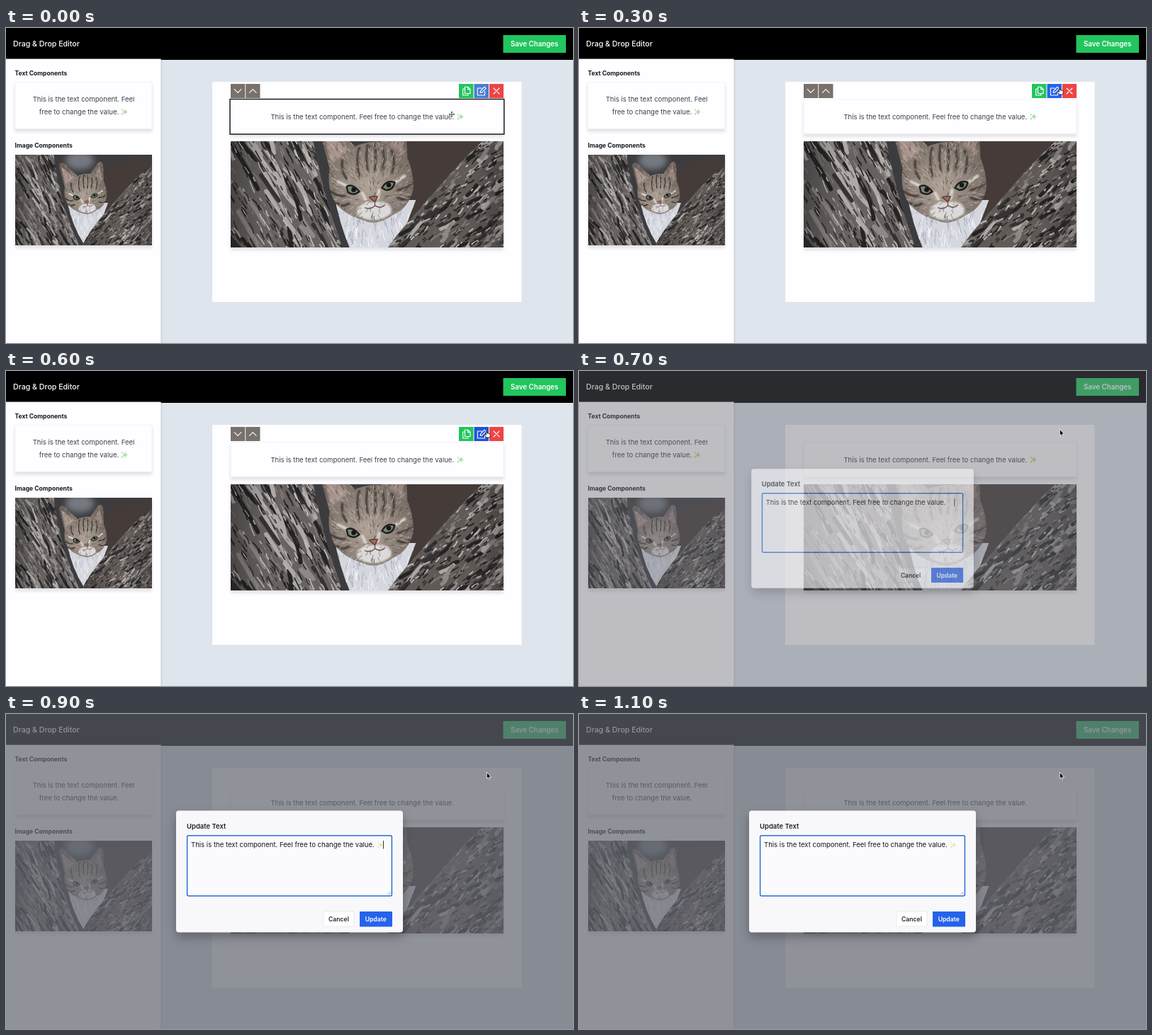
Write an HTML page that moves like this. It is 800 by 445 pixels and loops after 1.7 s.

```html
<!DOCTYPE html>
<html lang="en">
<head>
<meta charset="utf-8">
<title>Drag &amp; Drop Editor</title>
<style>
  html, body { margin: 0; width: 100%; height: 100%; overflow: hidden; background: #dfe5ed; }
  #stage { display: block; width: 800px; height: 445px; font-family: Inter, "Liberation Sans", sans-serif; }
  text { white-space: pre; }
  .mid { text-anchor: middle; }
  .body { font-size: 9.55px; fill: #3c4047; }
  .head { font-size: 8.55px; font-weight: 700; fill: #16181d; }
  .btn { font-size: 8.65px; font-weight: 600; }
  .card { filter: drop-shadow(0 4px 2px #0000001c); }
  .line { fill: none; stroke-linecap: round; stroke-linejoin: round; }
</style>
</head>
<body>
<svg id="stage" viewBox="0 0 800 445">
  <defs>
    <path id="star" d="M0-4.5Q.7-.7 4.5 0Q.7.7 0 4.5Q-.7.7-4.5 0Q-.7-.7 0-4.5Z"/>
    <g id="sparkle">
      <use href="#star" transform="translate(1 0)"/>
      <use href="#star" transform="translate(-3 -3) scale(.4)"/>
      <use href="#star" transform="translate(-3 3) scale(.45)"/>
    </g>

    <path id="leftShape" d="M0 0H54C60 40 68 78 90 128H0Z"/>
    <path id="rightShape" d="M193 14C166 34 145 62 120 90C109 104 101 116 95 128H193Z"/>
    <path id="headShape" d="M70 46L62 16Q64 9 70 13L88 30Q98 26 106 27L117 11Q122 8 124 14L125 38Q130 50 129 61Q126 74 114 79Q103 87 93 82Q79 78 73 68Q68 58 70 46Z"/>
    <path id="chestShape" d="M74 68Q80 100 98 128H108L131 68Z"/>
    <clipPath id="leftClip"><use href="#leftShape"/></clipPath>
    <clipPath id="rightClip"><use href="#rightShape"/></clipPath>
    <clipPath id="headClip"><use href="#headShape"/></clipPath>
    <clipPath id="chestClip"><use href="#chestShape"/></clipPath>
    <filter id="soft" x="-50%" y="-50%" width="200%" height="200%"><feGaussianBlur stdDeviation="4"/></filter>
    <filter id="haze"><feGaussianBlur stdDeviation=".6"/></filter>
    <radialGradient id="face" cx=".52" cy=".65" r=".6">
      <stop stop-color="#b1a498"/>
      <stop offset="1" stop-color="#6c625b"/>
    </radialGradient>
    <linearGradient id="shade" x2="1">
      <stop stop-color="#000" stop-opacity=".3"/>
      <stop offset=".3" stop-color="#000" stop-opacity="0"/>
      <stop offset=".75" stop-color="#000" stop-opacity="0"/>
      <stop offset="1" stop-color="#000" stop-opacity=".25"/>
    </linearGradient>

    <g id="photo" class="line">
      <rect width="193" height="128" fill="#3c3c3f"/>
      <ellipse cx="91" cy="8" rx="20" ry="13" fill="#74797f" filter="url(#soft)"/>
      <path d="M118 32Q140 2 193 4V50L122 90Z" fill="#443b37" filter="url(#soft)"/>
      <use href="#leftShape" fill="#676261"/>
      <g id="leftBark" clip-path="url(#leftClip)"/>
      <use href="#leftShape" fill="url(#shade)"/>
      <use href="#chestShape" fill="#d5d7df"/>
      <g id="chest" clip-path="url(#chestClip)"/>
      <use href="#headShape" fill="url(#face)"/>
      <g filter="url(#haze)">
        <path d="M65 17L71 43L83 32Z" fill="#a8948d"/>
        <path d="M119 15L112 29L123 37Z" fill="#9a857d"/>
        <path d="M96 70Q87 72 90 79Q102 86 113 78Q116 71 106 69Z" fill="#dcd9da"/>
        <path d="M82 58L76 55M93 63L96 69M105 61L104 67M117 55L123 51" stroke="#ded8d2" stroke-width="2"/>
        <path d="M91 51Q88 40 91 31M97 47Q95 38 97 29M102 47Q103 36 102 29M107 47Q110 39 107 30M114 49Q117 42 114 33M82 53Q78 47 79 40M81 65Q76 66 71 62M84 70Q79 74 75 70M118 61Q125 60 128 56M117 66Q123 69 127 66" stroke="#302b28" stroke-width="1.3"/>
      </g>
      <g id="fur" clip-path="url(#headClip)"/>
      <g stroke="#221f1d" stroke-width="1.2" fill="#76887a">
        <path d="M82 58.5Q86 56 91 62Q87 65.5 83 62.5Z"/>
        <path d="M107 59.5Q110 53.5 116 55.5Q115 61 110 61Z"/>
      </g>
      <g fill="#151716"><circle cx="87" cy="60.7" r="1.7"/><circle cx="111.8" cy="57.4" r="1.7"/></g>
      <path d="M98 66Q101 65 104 65.5L102 69.5Z" fill="#a0695c" stroke="#4c3630" stroke-width=".6"/>
      <path d="M102 70V72Q99 75 95 73.5M102 72Q106 74.5 109 71.5" stroke="#66544d" stroke-width=".7"/>
      <use href="#rightShape" fill="#605a56"/>
      <g id="rightBark" clip-path="url(#rightClip)"/>
      <use href="#rightShape" fill="url(#shade)"/>
    </g>
  </defs>

  <rect width="800" height="445" fill="#dfe5ed"/>
  <rect width="800" height="45"/>
  <rect y="43.6" width="218.5" height="402" fill="#fefdff" style="filter:drop-shadow(1px 0 1px #0002)"/>
  <text x="10" y="26.3" font-size="10.6" font-weight="500" fill="#fff">Drag &amp; Drop Editor</text>
  <rect x="701.5" y="10" width="88.5" height="25" fill="#22c55e"/>
  <text class="mid" x="745.7" y="26.2" font-size="9.75" font-weight="600" fill="#fff">Save Changes</text>

  <text class="head" x="12.5" y="67">Text Components</text>
  <rect class="card" x="12.5" y="76.5" width="193.5" height="66" fill="#fefdff" stroke="#eeeef2" stroke-width=".7"/>
  <text class="body mid" x="109.5" y="104.2">This is the text component. Feel</text>
  <text class="body mid" x="103" y="121.8">free to change the value.</text>
  <text class="head" x="12.5" y="169">Image Components</text>
  <g class="card"><svg x="13" y="179" width="193" height="128" viewBox="0 0 193 128"><use href="#photo"/></svg></g>

  <rect x="291" y="76" width="436.5" height="311" fill="#fefdff"/>
  <rect class="card" x="317" y="101" width="385" height="48.5" fill="#fefdff" stroke="#eeeef2" stroke-width=".7"/>
  <text class="body mid" x="502.8" y="128.6">This is the text component. Feel free to change the value.</text>
  <g class="card"><svg x="317" y="160" width="385" height="150" viewBox="0 0 193 128" preserveAspectRatio="xMidYMid slice"><use href="#photo"/></svg></g>
  <g id="stars"><use href="#sparkle" x="641" y="125.3"/><use href="#sparkle" x="167" y="118.5"/></g>

  <rect id="outline" x="316" y="100.5" width="386.8" height="49.5" fill="none" stroke="#111" stroke-width="1.4"/>
  <g id="tools">
    <path d="M317 79h20.3v20H317ZM338.2 79h20.3v20h-20.3Z" fill="#78716c"/>
    <rect x="639" y="79" width="20.5" height="20" fill="#22c55e"/>
    <rect id="edit" x="660.5" y="79" width="20.5" height="20"/>
    <rect x="682" y="79" width="20" height="20" fill="#ef4444"/>
    <g class="line" stroke="#fff" stroke-width="1.1">
      <path d="M322.3 86.7L327.1 91.3L331.9 86.7M343.5 91.3L348.3 86.7L353.1 91.3"/>
      <path d="M647.5 83.3H652L655 86.3V92.5H647.5ZM651.7 83.5V86.6H655M647.5 86H644.7V95H652V92.7"/>
      <path d="M671.5 85H665.3V95H675.5V89.5M669 91.5L669.6 88.8L675 83.2L677.2 85.3L671.7 90.9Z"/>
      <path d="M688 85L696 93M696 85L688 93"/>
    </g>
  </g>

  <rect id="veil" width="800" height="445" fill="#63666f"/>

  <g id="modal">
    <rect x="240" y="136.5" width="320" height="172" rx="4" fill="#f8f8fb" style="filter:drop-shadow(0 7px 7px #0004)"/>
    <text x="255" y="162.3" font-size="9.5" font-weight="600" fill="#20242c">Update Text</text>
    <rect x="255.6" y="171.8" width="288.8" height="85.2" rx="2" fill="#fbfafd" stroke="#2a6fd0" stroke-width="1.5"/>
    <text x="261" y="188" font-size="9.55" fill="#14161a">This is the text component. Feel free to change the value.</text>
    <use id="modalStar" href="#sparkle" x="528" y="185" fill="#e8e9c4"/>
    <path id="caret" d="M532.5 179V190.5" stroke="#222" stroke-width=".9"/>
    <path d="M538.5 255L542.5 251M541 255L542.5 253.5" stroke="#777" stroke-width=".6"/>
    <rect x="448" y="279" width="43" height="21" rx="1" fill="#fff" stroke="#e5e6ec" stroke-width=".8"/>
    <text class="btn mid" x="469.5" y="293.2" fill="#24272e">Cancel</text>
    <rect x="499" y="279" width="46" height="21.5" fill="#2563eb"/>
    <text class="btn mid" x="521.7" y="293.2" fill="#fff">Update</text>
  </g>

  <g class="line" stroke="#fff" stroke-width=".8">
    <path id="move" fill="#000" d="M0-4.6L1.9-2.3H.7V-.7H2.3V-1.9L4.6 0L2.3 1.9V.7H.7V2.3H1.9L0 4.6L-1.9 2.3H-.7V.7H-2.3V1.9L-4.6 0L-2.3-1.9V-.7H-.7V-2.3H-1.9Z"/>
    <path id="hand" fill="#fff" stroke="#111" d="M-1.8 1V-4Q-1-5.4-.3-4V-1Q1-1.8 1.4-.7Q2.8-1.2 3-.2Q4.4-.4 4.3 1Q4.4 3.5 3.2 5H-1.2Q-2.5 3.3-4 1.2Q-3.4-.3-1.8 1Z"/>
    <path id="arrow" fill="#000" d="M678.3 82.6V91.3L680.2 89.6L681.6 92.6L683 92L681.7 89.1H684.2Z"/>
  </g>
</svg>
<script>
const $ = id => document.getElementById(id);

let seed = 71;
const rnd = (a, b) => a + (b - a) * ((seed = seed * 16807 % 2147483647) / 2147483647);

// Adds two rounds of short wavy strokes; place() returns [x, y, angle, length].
function texture(id, colors, count, width, place) {
  for (let i = 0; i < colors.length * 2; i++) {
    let d = '';
    for (let n = 0; n < count; n++) {
      const [x, y, angle, len] = place();
      const dx = Math.cos(angle) * len, dy = Math.sin(angle) * len, bend = rnd(-.2, .2);
      d += `M${x.toFixed(1)} ${y.toFixed(1)}q${[dx / 2 - dy * bend, dy / 2 + dx * bend, dx, dy].map(v => v.toFixed(1))}`;
    }
    const path = document.createElementNS('http://www.w3.org/2000/svg', 'path');
    path.setAttribute('d', d);
    path.setAttribute('stroke', colors[i % colors.length]);
    path.setAttribute('stroke-width', width);
    $(id).append(path);
  }
}

const ridges = ['#8e8886', '#252324', '#aea9a7', '#353233'];
const grain = ['#c3bebb', '#242223', '#837c79', '#353131', '#6a6461'];
const left = (min, max) => () => [rnd(-15, 86), rnd(-25, 122), rnd(.95, 1.2), rnd(min, max)];
const right = (min, max) => () => [rnd(90, 205), rnd(5, 130), rnd(2.1, 2.75), rnd(min, max)];
texture('leftBark', ridges, 12, 3, left(20, 45));
texture('leftBark', grain, 75, .8, left(2, 9));
texture('rightBark', ridges, 26, 2.6, right(4, 14));
texture('rightBark', grain, 120, .9, right(1, 5));
texture('fur', ['#4b433d', '#b3a79c', '#736860', '#d0c7bf'], 120, .35, () => {
  const x = rnd(60, 132), y = rnd(8, 84);
  return [x, y, Math.atan2(y - 67, x - 101) + rnd(-.3, .3), rnd(1, 3)];
});
texture('chest', ['#f4f4f8', '#aaaeba'], 50, .5, () => [rnd(74, 132), rnd(70, 126), rnd(1.1, 2), rnd(3, 8)]);

const show = (id, on) => $(id).style.display = on ? '' : 'none';

function draw(now) {
  const t = Math.floor(now % 1700 / 100) * 100;
  const opened = t >= 700, hover = t >= 200;

  const k = Math.min(t / 300, 1), go = k * k * (3 - 2 * k);
  const at = `translate(${629 + 50 * go} ${122 - 33 * go})`;
  $('move').setAttribute('transform', at);
  $('hand').setAttribute('transform', at);
  show('move', !hover);
  show('hand', hover && !opened);
  show('arrow', opened);
  show('outline', !hover);
  show('tools', !opened);
  $('edit').setAttribute('fill', t >= 500 ? '#1f53d8' : hover ? '#2563eb' : '#4a7cd2');
  $('stars').setAttribute('fill', opened ? '#e2cf72' : '#b4dcae');
  show('stars', t < 800);

  const rest = 1 - Math.min(Math.max((t - 600) / 270, 0), 1), p = 1 - rest * rest;
  $('veil').setAttribute('opacity', .7 * p);
  $('modal').setAttribute('opacity', p);
  $('modal').setAttribute('transform', `translate(400 222.5) scale(${.95 + .05 * p}) translate(-400 -222.5)`);
  show('modal', opened);
  show('modalStar', t >= 800);
  show('caret', t < 1100);
}

const start = performance.now();
(function loop() {
  draw(performance.now() - start);
  requestAnimationFrame(loop);
})();
</script>
</body>
</html>
```
